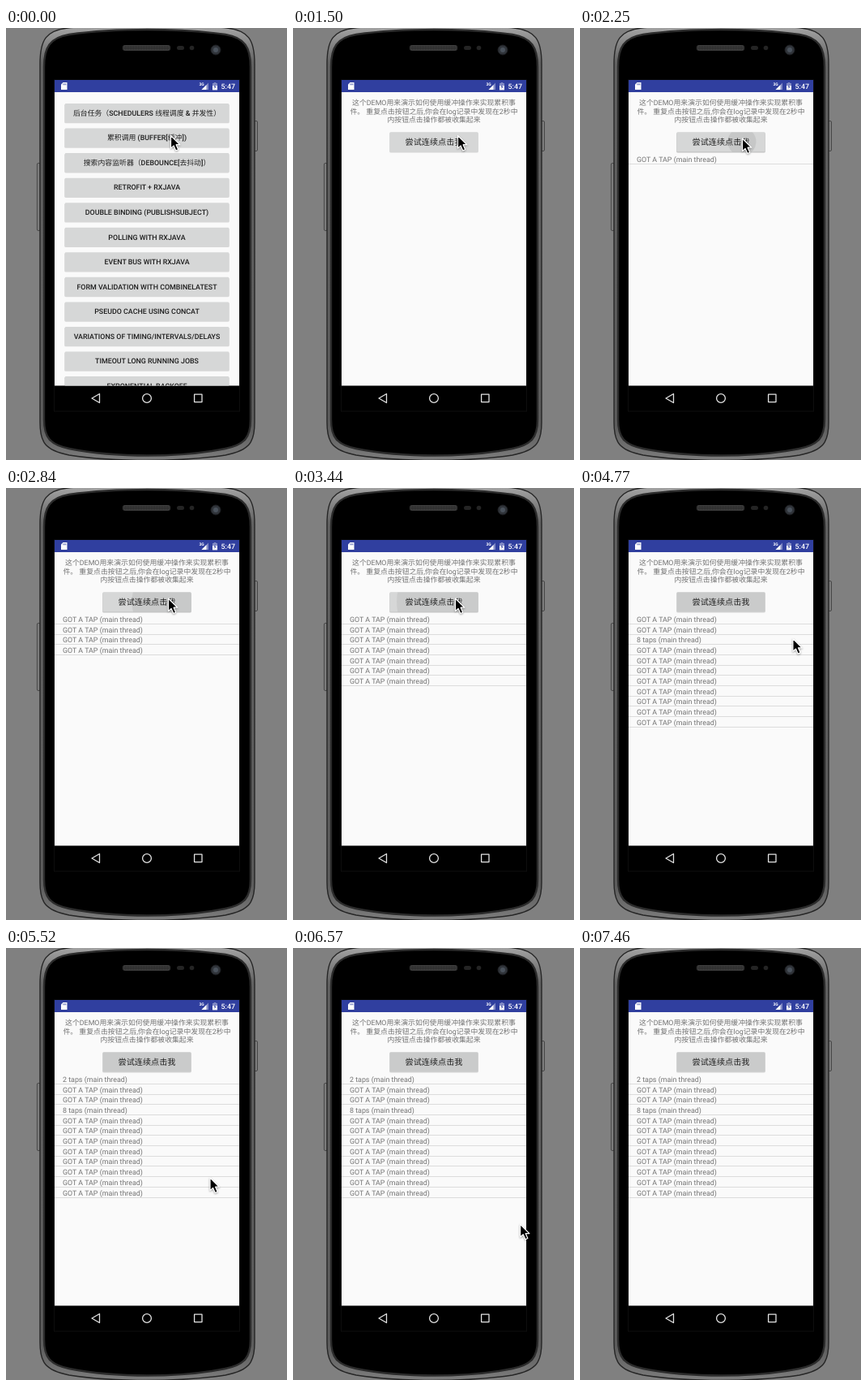
Recreate the animation shown at these times as an HTML page. Size 347 by 532 pixels, loop 7560 ms.

```html
<!DOCTYPE html>
<html lang="zh">
<head>
<meta charset="utf-8">
<title>Buffer demo</title>
<style>
  html, body { margin: 0; width: 100%; height: 100%; overflow: hidden; background: #808080; }
  svg { display: block; width: 347px; height: 532px; }
  text { font: 8.87px Roboto, "Noto Sans CJK SC", "Noto Sans CJK", sans-serif; text-rendering: geometricPrecision; }
  .mid { text-anchor: middle; }
  .menu text { font-weight: 500; fill: #1d1d1d; }
  .note text, .log text { fill: #737373; }
  .tap { font-size: 10.13px; fill: #1d1d1d; }
</style>
</head>
<body>
<svg viewBox="0 0 347 532">
  <defs>
    <clipPath id="view"><rect x="60" y="79" width="228" height="361.5"/></clipPath>
    <clipPath id="tapClip"><rect x="119.4" y="128.3" width="109.2" height="24.2" rx="1.3"/></clipPath>
    <linearGradient id="rim" gradientUnits="userSpaceOnUse" x1="0" y1="0" x2="0" y2="532">
      <stop offset="0" stop-color="#a2a2a2"/>
      <stop offset=".08" stop-color="#626262"/>
      <stop offset=".92" stop-color="#5c5c5c"/>
      <stop offset="1" stop-color="#7c7c7c"/>
    </linearGradient>
    <pattern id="mesh" width="2" height="2" patternUnits="userSpaceOnUse">
      <rect width="2" height="2" fill="#2c2c2c"/><rect width="1" height="1" fill="#484848"/>
    </pattern>
    <g id="half">
      <path d="M176 -4C140 -4 104 -3 76 0C50 3 42 14 42 44V486C42 510 48 520 78 526C110 531 140 532.5 176 532.5" fill="url(#rim)" stroke="#262626" stroke-width="1.4"/>
      <path d="M176 2C140 2 106 4 78 8C54 12 47 24 47 48V482C47 504 54 513 78 518C108 524 140 526.500 176 526.500" stroke="#2c2c2c" stroke-width="2.4"/>
    </g>
  </defs>

  <rect width="347" height="532" fill="#808080"/>
  <g stroke="#3a3a3a" stroke-width=".8" fill="#7c7c7c">
    <rect x="38.4" y="166.5" width="4" height="83" rx="1.5"/>
    <rect x="306.5" y="114.5" width="4" height="37" rx="1.5"/>
  </g>
  <use href="#half"/>
  <use href="#half" transform="matrix(-1 0 0 1 349 0)"/>
  <rect x="144.5" y="21.5" width="58" height="6" rx="2" fill="url(#mesh)" stroke="#3c3c3c"/>
  <rect x="211" y="22" width="9" height="5" rx="2.5" fill="#242424"/>
  <circle cx="229.5" cy="24.5" r="2.8" fill="#242424"/>
  <circle cx="259" cy="27" r="6" fill="#30343a" stroke="#1d1f22"/>
  <circle cx="259" cy="27" r="3" fill="#4a525c"/>

  <rect x="59.5" y="64" width="229" height="408" stroke="#0e0e0e"/>
  <rect x="60" y="64" width="228" height="376.5" fill="#fafafa"/>
  <rect x="60" y="64" width="228" height="15" fill="#303f9f"/>
  <g fill="#fff">
    <path d="M70.5 67H75.5V76H68V69.5Z"/>
    <path d="M70.8 68.3V70.3M72.3 68.3V70.3M73.8 68.3V70.3" stroke="#303f9f" stroke-width=".7"/>
    <text x="238.5" y="71" style="font-size:5px;font-weight:700">3G</text>
    <path d="M250 67.5V76H241.500Z" opacity=".4"/>
    <path d="M247.500 70V76H241.500Z"/>
    <path d="M256.7 67H259.3V68H261V76.3H255V68H256.7Z" opacity=".4"/>
    <path d="M255 71H261V76.300H255Z"/>
    <path d="M258.6 69.5L256.6 72.6H257.9L257.4 75L259.5 71.9H258.2Z" fill="#303f9f"/>
    <text x="265.5" y="75" style="font-weight:500">5:47</text>
  </g>
  <g fill="none" stroke="#e2e2e2" stroke-width="1.3" stroke-linejoin="round">
    <path d="M115.5 450.5V461.5L106 456Z"/>
    <circle cx="174" cy="456" r="5.4"/>
    <rect x="232.6" y="451.2" width="9.4" height="9.4"/>
  </g>

  <g clip-path="url(#view)">
    <g id="menu" class="menu"></g>
    <g id="demo">
      <g class="note mid">
        <text x="174" y="95.3">这个DEMO用来演示如何使用缓冲操作来实现累积事</text>
        <text x="174" y="105.7" xml:space="preserve">件。 重复点击按钮之后,你会在log记录中发现在2秒中</text>
        <text x="174" y="116.2">内按钮点击操作都被收集起来</text>
      </g>
      <rect id="lift" x="119.2" y="128.8" width="109.6" height="24.7" rx="1.6"/>
      <rect id="tapBox" x="119.4" y="128.3" width="109.2" height="24.2" rx="1.3"/>
      <g clip-path="url(#tapClip)"><circle id="ripple" cx="200" cy="140"/></g>
      <text class="tap mid" x="174" y="144.2">尝试连续点击我</text>
      <g id="log" class="log"></g>
    </g>
  </g>

  <path id="cursor" d="M0 0V15.6L3.6 12.4L6.3 18.5L9.2 17.2L6.6 11.2H11.3Z" stroke="#fff" stroke-width="1.2" stroke-linejoin="round" style="filter:drop-shadow(0 1px 1px rgba(0,0,0,.35))"/>
</svg>
<script>
const LOOP = 7560;
const TICK = 149.3;
const MENU_END = 1485;
const FIRST_TAP = 2230, TAP_GAP = 190, TAPS = 10;
const FIRST_FLUSH = 3570, FLUSH_GAP = 1945;

const $ = id => document.getElementById(id);
const clamp = v => Math.min(1, Math.max(0, v));

function add(parent, tag, attrs, text = '') {
  const el = document.createElementNS('http://www.w3.org/2000/svg', tag);
  for (const k in attrs) el.setAttribute(k, attrs[k]);
  el.textContent = text;
  parent.append(el);
  return el;
}

const titles = [
  '后台任务（SCHEDULERS 线程调度 & 并发性）',
  '累积调用 (BUFFER[缓冲])',
  '搜索内容监听器（DEBOUNCE[去抖动]）',
  'RETROFIT + RXJAVA',
  'DOUBLE BINDING (PUBLISHSUBJECT)',
  'POLLING WITH RXJAVA',
  'EVENT BUS WITH RXJAVA',
  'FORM VALIDATION WITH COMBINELATEST',
  'PSEUDO CACHE USING CONCAT',
  'VARIATIONS OF TIMING/INTERVALS/DELAYS',
  'TIMEOUT LONG RUNNING JOBS',
  'EXPONENTIAL BACKOFF'
];
titles.forEach((title, i) => {
  const y = 93 + i * 30.55;
  add($('menu'), 'rect', { x: 72.2, y: y + 0.7, width: 203.6, height: 23.6, rx: 1.6, opacity: 0.14 });
  add($('menu'), 'rect', { x: 72.7, y, width: 202.6, height: 23, rx: 1.3, fill: '#d6d7d7' });
  add($('menu'), 'text', { x: 174, y: Math.round(y + 14.8), class: 'mid' }, title);
});

// Taps come at a steady pace; each flush reports the taps since the last one.
const taps = Array.from({ length: TAPS }, (_, i) => FIRST_TAP + i * TAP_GAP);
const events = taps.map(time => ({ time, text: 'GOT A TAP' }));
for (let end = FIRST_FLUSH; end < LOOP - FLUSH_GAP; end += FLUSH_GAP) {
  const n = taps.filter(time => time <= end && time > end - FLUSH_GAP).length;
  events.push({ time: end, text: `${n} taps` });
}
events.sort((a, b) => a.time - b.time);

const rows = events.map((_, i) => {
  const y = Math.round(154.85 + i * 12.7);
  const g = add($('log'), 'g', {});
  const label = add(g, 'text', { x: 70, y: y + 10 });
  add(g, 'rect', { x: 60, y: y + 12, width: 228, height: 1, fill: '#dcdcdc' });
  return { g, label };
});

// Each move is a Bezier curve given by its x and y control values.
const linear = u => u;
const easeOut = u => Math.sin(u * Math.PI / 2);
const moves = [
  { from: 1800, to: 2100, ease: linear, x: [203.5, 202.5, 201.5, 200.5], y: [132.5, 134, 135, 136] },
  { from: 4180, to: 5520, ease: easeOut, x: [200.5, 265, 285, 252], y: [136, 190, 165, 283] },
  { from: 6120, to: 7460, ease: linear, x: [252, 268, 345, 270], y: [283, 330, 395, 585] }
];
const bezier = ([a, b, c, d], u, v = 1 - u) =>
  v * v * v * a + 3 * v * v * u * b + 3 * v * u * u * c + u * u * u * d;

function drawCursor(t) {
  const m = moves.findLast(move => move.from <= t) || moves[0];
  const u = m.ease(clamp((t - m.from) / (m.to - m.from)));
  $('cursor').setAttribute('transform', `translate(${bezier(m.x, u)} ${bezier(m.y, u)})`);
}

function drawButton(t) {
  const age = t - (taps.findLast(time => time <= t) ?? -LOOP);
  const glow = clamp(1 - age / 200);
  $('ripple').setAttribute('r', 8 + Math.min(age, 200));
  $('ripple').setAttribute('opacity', 0.08 * glow);
  $('lift').setAttribute('opacity', 0.15 + 0.1 * glow);
  const grey = Math.round(214 - 12 * clamp((t - 3950) / 400));
  $('tapBox').setAttribute('fill', `rgb(${grey},${grey + 1},${grey + 1})`);
}

function drawLog(t) {
  const shown = events.filter(e => e.time <= t).reverse();
  rows.forEach(({ g, label }, i) => {
    g.style.display = shown[i] ? '' : 'none';
    if (shown[i]) label.textContent = `${shown[i].text} (main thread)`;
  });
}

function draw(time) {
  const t = Math.floor((time + 5) / TICK) * TICK;
  const menu = t < MENU_END;
  $('menu').style.display = menu ? '' : 'none';
  $('demo').style.display = menu ? 'none' : '';
  drawCursor(t);
  drawButton(t);
  drawLog(t);
}

const start = performance.now();
function tick() {
  draw((performance.now() - start) % LOOP);
  requestAnimationFrame(tick);
}
tick();
</script>
</body>
</html>
```
